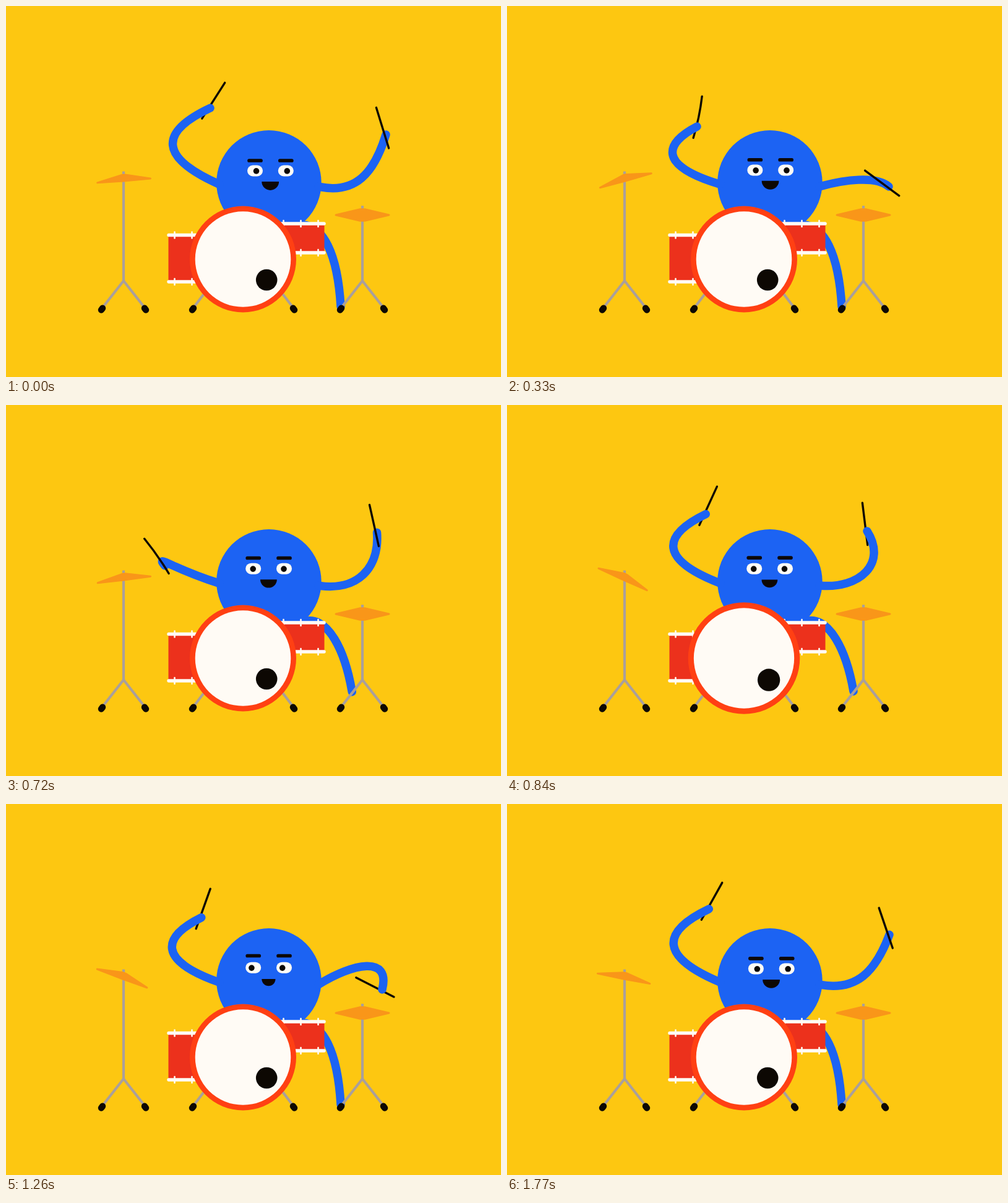
An HTML page for the animation above (1.8 s loop, 800 by 600 pixels).

```html
<!DOCTYPE html>
<html lang="en">
<head>
<meta charset="utf-8">
<title>Drummer</title>
<style>
  html, body { margin: 0; width: 100%; height: 100%; overflow: hidden; background: #fdc711; }
  svg { display: block; width: 100vw; height: 100vh; }
  .line { fill: none; stroke-linecap: round; stroke-linejoin: round; }
  .limb { stroke: #1c63f3; stroke-width: 13.5; }
  .stick { stroke: #0d0803; stroke-width: 3.4; }
  .metal { stroke: #aa9f9b; stroke-width: 4.2; stroke-linecap: butt; }
  .foot { stroke: #0d0803; stroke-width: 10.5; }
  .cymbal { fill: #f99619; stroke: #f99619; stroke-width: 3; stroke-linejoin: round; }
  .shell { fill: #ec311c; }
  .rim { stroke: #fffbf5; stroke-width: 5.5; }
  .lug { stroke: #fffbf5; stroke-width: 2.6; }
  .white { fill: #fffbf5; }
  .ink { fill: #0d0803; }
</style>
</head>
<body>
<svg viewBox="0 0 800 600">
  <rect width="800" height="600" fill="#fdc711"/>
  <path id="leg" class="line limb"/>
  <circle cx="424.9" cy="285.8" r="84.8" fill="#1c63f3"/>
  <g id="eyes">
    <rect class="white" x="-12.5" y="-9" width="25" height="18" rx="9"/>
    <rect class="white" x="37.3" y="-9" width="25" height="18" rx="9"/>
  </g>
  <g id="pupils" class="ink"><circle r="4.8"/><circle cx="49.8" r="4.8"/></g>
  <g id="brows" class="ink">
    <rect x="-12.3" y="-2.8" width="24.6" height="5.6" rx="2.6"/>
    <rect x="37.5" y="-2.8" width="24.6" height="5.6" rx="2.6"/>
  </g>
  <path id="mouth" class="ink" d="M-1 0H1A1 1 0 0 1 -1 0Z"/>
  <g id="toms"></g>
  <g id="stands"></g>
  <g id="bass">
    <circle r="86" fill="#ff4013"/>
    <circle r="77.3" class="white"/>
    <circle cx="38.2" cy="33.5" r="17.3" class="ink"/>
  </g>
  <path class="cymbal" d="M533 338L572 328.8H580L619 338L580 347.2H572Z"/>
  <path id="hat" class="cymbal" d="M-43 7L-2 -2.4H3L43 7L0 7.6Z"/>
  <g id="left"></g>
  <g id="right"></g>
</svg>
<script>
const LOOP = 1800, STEP = 30, BEAT = 450;
const el = id => document.getElementById(id);
const set = (node, attrs) => {
  for (const key in attrs) node.setAttribute(key, attrs[key]);
};
const move = (id, x, y, more = '') =>
  set(el(id), { transform: `translate(${x} ${y}) ${more}` });
const line = (kind, d) => `<path class="line ${kind}" d="${d}"/>`;

// Static hardware
const foot = (x, dir) => line('foot', `M${x - dir} 491.5L${x + dir} 488.8`);
const legs = (x, top, spread) => [-1, 1].map(side =>
  line('metal', `M${x} ${top}L${x + side * spread} 489`) +
  foot(x + side * spread, -side)).join('');
const stand = (x, top) => line('metal', `M${x} ${top}V446`) + legs(x, 444.5, 35);
const tom = (x1, x2, y1, y2, lugs) =>
  `<rect class="shell" x="${x1}" y="${y1}" width="${x2 - x1}" height="${y2 - y1}"/>` +
  [y1, y2].map(y => line('rim', `M${x1 + .5} ${y}H${x2 - .5}`) +
    lugs.map(x => line('lug', `M${x} ${y - 5}V${y + 5}`)).join('')).join('');

el('toms').innerHTML = tom(262.5, 340, 370.5, 446, [272.5, 300.5]) +
  tom(425, 514.5, 352, 399, [448.5, 476.5, 504.5]);
el('stands').innerHTML = stand(190, 267.5) + stand(576, 323) + legs(383.5, 383, 81.5);
for (const id of ['left', 'right'])
  el(id).innerHTML = line('stick', '') + line('limb', '') + line('stick', '');

// Smooth looping curve through [time, value] points, without overshoot
function curve(points, period) {
  const n = points.length;
  const point = i => {
    const wrap = Math.floor(i / n), [t, v] = points[i - wrap * n];
    return [t + wrap * period, v];
  };
  const slope = (p, q) => (q[1] - p[1]) / (q[0] - p[0]);
  const mean = (p, q) => p * q > 0 ? 2 * p * q / (p + q) : 0;
  return time => {
    const t = (time + period) % period;
    let i = n - 1;
    while (i >= 0 && points[i][0] > t) i--;
    const [a, b, c, d] = [i - 1, i, i + 1, i + 2].map(point);
    const span = c[0] - b[0], u = (t - b[0]) / span, w = 1 - u;
    const enter = mean(slope(a, b), slope(b, c)) * span;
    const leave = mean(slope(b, c), slope(c, d)) * span;
    return b[1] + (c[1] - b[1]) * u * u * (3 - 2 * u) + enter * u * w * w - leave * u * u * w;
  };
}

// Poses along a swing, from raised to struck: two curve handles, hand, stick angle
const leftArm = {
  shoulder: [345, 288.5], front: s => s > 1.5, bulge: -24,
  grip: angle => 16.5 - .11 * angle,
  poses: [
    [247, 245, 247, 204, 330, 165, 32.5],
    [242, 258, 255, 222, 307, 195, 11.8],
    [290, 270, 229, 256, 258, 315, -74.7]
  ],
  swing: curve([[0, 0], [120, 1.84], [165, 2], [180, 2], [330, 1], [360, .62], [405, .28]], BEAT)
};
const rightArm = {
  shoulder: [505, 292], front: s => s > .5 && s < 3.5, bulge: 0,
  grip: () => 12,
  poses: [
    [570, 298, 615, 256, 582, 204, -7],
    [565, 305, 595, 270, 614, 208, -17.2],
    [565, 293, 598, 278, 643, 232, -28.6],
    [545, 281, 596, 274, 617, 292, -53.6],
    [560, 258, 622, 244, 608, 300, -63]
  ],
  swing: curve([[0, 1], [135, 0], [330, 3], [360, 4], [570, 1.9], [840, 0],
    [1050, 0], [1260, 4], [1530, 2]], LOOP)
};

function poseAt(arm, s) {
  const i = Math.min(Math.floor(s), arm.poses.length - 2), f = s - i;
  const pose = arm.poses[i].map((v, k) => v + (arm.poses[i + 1][k] - v) * f);
  if (i === 1) pose[4] += arm.bulge * 4 * f * (1 - f);
  return pose;
}

function drawArm(id, arm, t) {
  const s = arm.swing(t);
  const [ax, ay, bx, by, hx, hy, angle] = poseAt(arm, s);
  const turn = angle - poseAt(arm, arm.swing(t - STEP))[6];
  const [under, limb, over] = el(id).children;
  set(limb, { d: `M${arm.shoulder}C${ax} ${ay} ${bx} ${by} ${hx} ${hy}` });
  // The stick bends back while it is lifted quickly
  const stick = {
    d: `M-2 -34.3Q${Math.max(0, turn - 8) * .2 - 2} 0 -2 34.3`,
    transform: `translate(${hx} ${hy}) rotate(${angle}) translate(0 ${-arm.grip(angle)})`
  };
  const front = arm.front(s);
  set(under, { ...stick, visibility: front ? 'hidden' : 'visible' });
  set(over, { ...stick, visibility: front ? 'visible' : 'hidden' });
}

const glance = curve([[0, 2], [840, -1], [1260, -2.8], [1530, 0]], LOOP);
const hatTilt = curve([[30, -12], [120, 43], [170, 50], [315, -24], [373, 27]], BEAT);
const lift = curve([[450, 0], [640, .9], [840, 1], [930, 0]], LOOP);
const kicks = [180, 840, 1530];

function drawFace(t) {
  const look = glance(t), sad = Math.max(0, -look), nod = Math.max(0, look) ** 2;
  const x = 399.7 + nod * .7, y = 264.7 + nod * .45;
  move('eyes', x, y);
  move('pupils', x + look, y + .4);
  move('brows', x, 248 + nod * .5 - sad * .9);
  move('mouth', x + 24.7, 282 + nod * .5 + sad * .4, `scale(${13.9 - sad})`);
}

function drawLeg(t) {
  const up = lift(t);
  const at = (x, y, dx, dy) => `${x + dx * up} ${y + dy * up}`;
  set(el('leg'), {
    d: `M${at(475, 354, 10, -5)}C${at(513, 352, 8, -9)} ${at(536, 402, 12, -7)} ${at(541, 486, 19, -23)}`
  });
}

function draw(t) {
  drawArm('left', leftArm, t);
  drawArm('right', rightArm, t);
  drawFace(t);
  drawLeg(t);
  move('hat', 190, 275.5, `rotate(${hatTilt(t)})`);
  const kicked = kicks.some(hit => Math.abs(t - hit) < 50);
  move('bass', 383, 409.5, `scale(${kicked ? 1.05 : 1})`);
}

const start = performance.now();
function tick() {
  const t = (performance.now() - start) % LOOP;
  draw(Math.floor(t / STEP) * STEP);
  requestAnimationFrame(tick);
}
draw(0);
requestAnimationFrame(tick);
</script>
</body>
</html>
```
